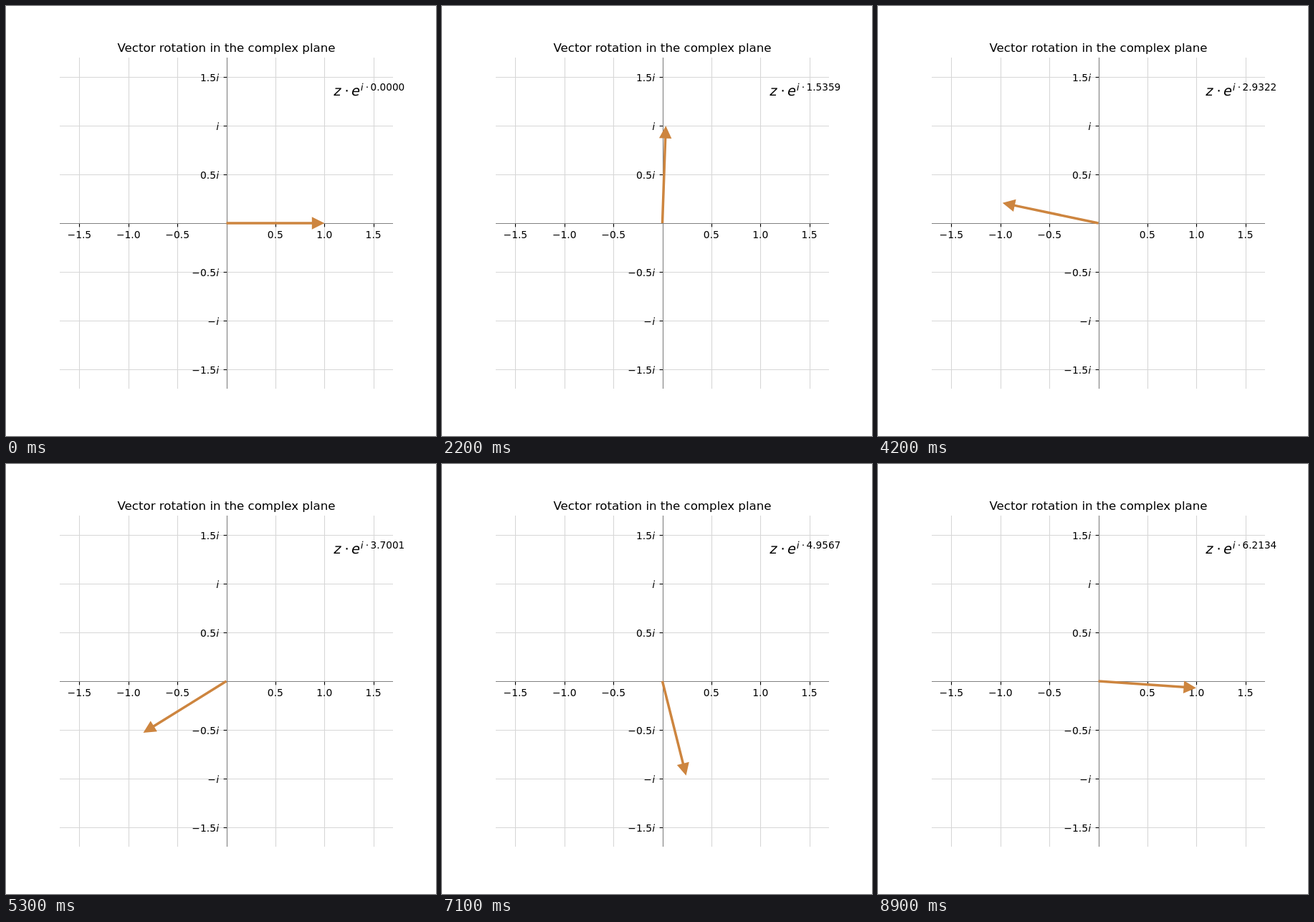
An HTML page that plays this animation: 600x600 px, repeating every 9000 ms.

```html
<!DOCTYPE html>
<html lang="en">
<head>
<meta charset="utf-8">
<title>Vector rotation</title>
<style>
  html, body { margin: 0; width: 100%; height: 100%; overflow: hidden; background: #fff; }
  svg { display: block; }
  text { font-family: "DejaVu Sans", sans-serif; fill: #000; white-space: pre; }
</style>
</head>
<body>
<svg id="stage" width="600" height="600" viewBox="0 0 600 600"></svg>
<script>
const stage = document.getElementById("stage");
const LEFT = 75, RIGHT = 540, TOP = 72, BOTTOM = 534;
const CX = 307.5, CY = 303;
const UX = (RIGHT - LEFT) / 3.4, UY = (BOTTOM - TOP) / 3.4;
const LINE = 1.11, TICK = 4.86;
const STEP_MS = 100, STEPS = 90;
const SHAFT = 0.0075 * (RIGHT - LEFT), HEAD = 5 * SHAFT;

function add(tag, attrs, content) {
  const el = document.createElementNS("http://www.w3.org/2000/svg", tag);
  for (const key in attrs) el.setAttribute(key, attrs[key]);
  if (content) el.textContent = content;
  stage.append(el);
  return el;
}

function line(x1, y1, x2, y2, stroke) {
  add("line", { x1, y1, x2, y2, stroke, "stroke-width": LINE });
}

function label(content, x, y, size, anchor = "start") {
  return add("text", { x, y, "font-size": size, "text-anchor": anchor }, content);
}

// Math letters: upright glyphs slanted around half their height
function slanted(content, x, y, size) {
  add("text", {
    transform: `translate(${x} ${y}) skewX(-11)`,
    x: -0.074 * size,
    "font-size": size
  }, content);
}

const snap = v => Math.floor(v + 0.5) + 0.5;
const px = v => snap(CX + v * UX);
const py = v => snap(CY - v * UY);
const ticks = [-1.5, -1, -0.5, 0.5, 1, 1.5];

for (const v of ticks) {
  line(px(v), TOP, px(v), BOTTOM, "#d7d7d7");
  line(LEFT, py(v), RIGHT, py(v), "#d7d7d7");
}

for (const v of ticks) {
  line(px(v), py(0), px(v), py(0) + TICK, "#000");
  line(px(0) - TICK, py(v), px(0), py(v), "#000");

  const sign = v < 0 ? "\u2212" : "";
  const size = Math.abs(v);
  label(sign + size.toFixed(1), CX + v * UX, 324, 13.89, "middle");

  const base = Math.ceil(CY - v * UY + 5.3);
  label(sign + (size === 1 ? "" : size), 293, base, 13.89, "end");
  slanted("i", 293.4, base, 13.89);
}

line(px(0), TOP, px(0), BOTTOM, "#808080");
line(LEFT, py(0), RIGHT, py(0), "#808080");

label("Vector rotation in the complex plane", CX, 64, 16.67, "middle");

const arrow = add("path", { fill: "#cd853f" });

slanted("z", 458, 125, 19.44);
label("\u22c5", 475.7, 125, 19.44, "middle");
slanted("e", 482.5, 125, 19.44);
slanted("i", 495.1, 118, 13.61);
label("\u22c5", 503.8, 118, 13.61, "middle");
const angleText = label("0.0000", 508.6, 118, 13.61);

function pose(angle) {
  const dx = UX * Math.cos(angle), dy = -UY * Math.sin(angle);
  const len = Math.hypot(dx, dy), neck = len - HEAD;
  const s = SHAFT / 2, h = HEAD / 2;
  const turn = Math.atan2(dy, dx) * 180 / Math.PI;
  arrow.setAttribute("d",
    `M0 ${-s}H${neck}V${-h}L${len} 0L${neck} ${h}V${s}H0Z`);
  arrow.setAttribute("transform", `translate(${CX} ${CY}) rotate(${turn})`);
  angleText.textContent = angle.toFixed(4);
}

let shown = -1;
function tick() {
  const step = Math.floor(performance.now() / STEP_MS) % STEPS;
  if (step !== shown) {
    shown = step;
    pose(step * 2 * Math.PI / STEPS);
  }
  requestAnimationFrame(tick);
}
tick();
</script>
</body>
</html>
```
